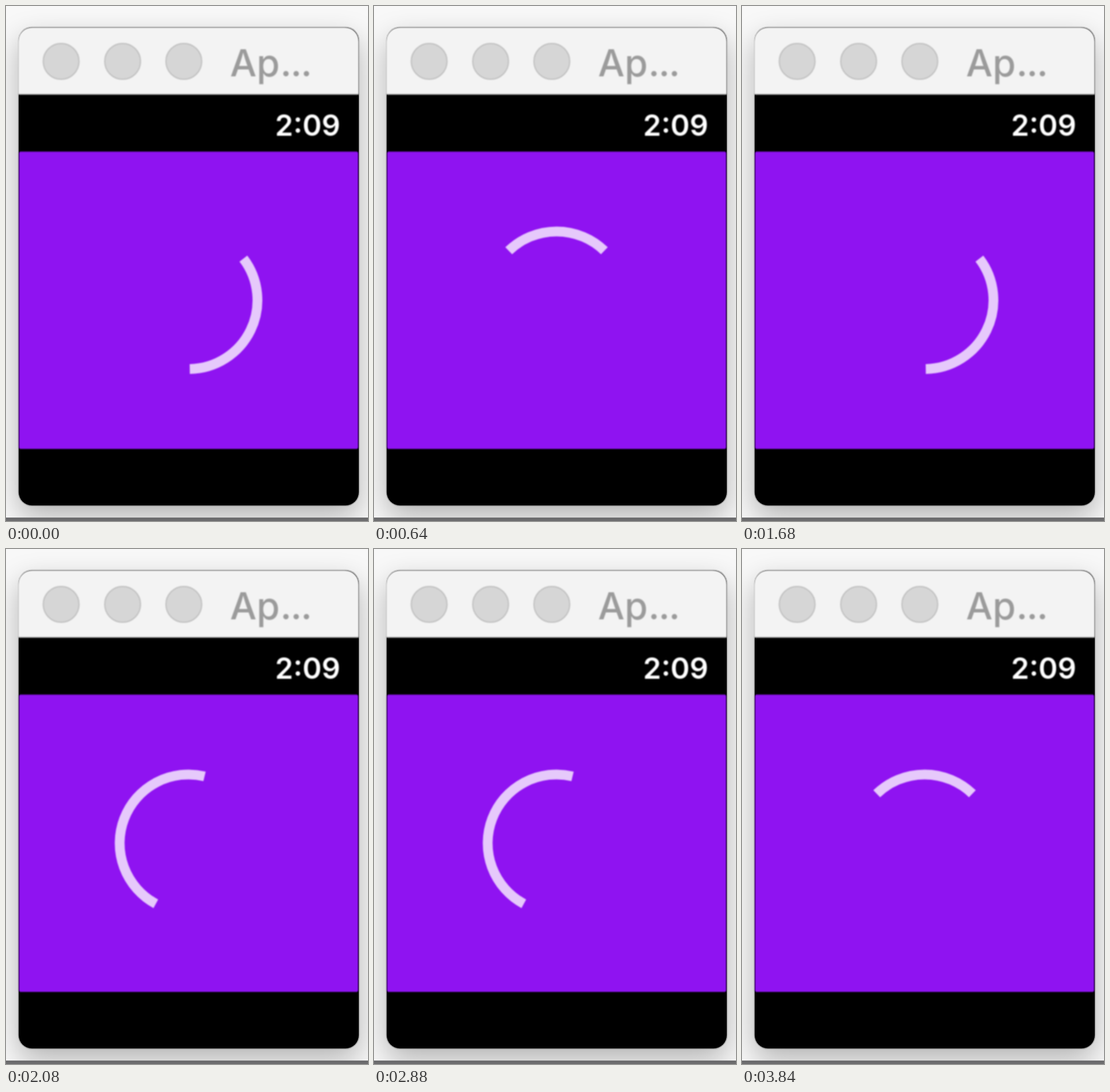
These frames come from a looping animation (627x893 px, 3920 ms). An HTML page:

```html
<!DOCTYPE html>
<html lang="en">
<head>
<meta charset="utf-8">
<title>Loading spinner</title>
<style>
  html, body { margin: 0; width: 100%; height: 100%; overflow: hidden; background: #f8f8f8; }
  .window {
    position: absolute; left: 21.5px; top: 37px; width: 589px; height: 828.5px;
    border-radius: 23px; background: #000; filter: blur(.7px);
    box-shadow: 0 0 0 1.5px rgba(0, 0, 0, .24), 0 20px 50px rgba(0, 0, 0, .28);
  }
  .desk { position: absolute; left: 0; right: 0; top: 887px; height: 6px; background: #6c6c6e; }
  svg { position: absolute; left: 0; top: 0; }
  text { font-family: Inter, sans-serif; }
  .soft { filter: blur(.8px); }
  .screen { filter: blur(1.3px); }
</style>
</head>
<body>
<div class="window"></div>
<div class="desk"></div>
<svg width="627" height="893" viewBox="0 0 627 893">
  <g class="soft">
    <path d="M21 153V61a24 24 0 0 1 24-24H587a24 24 0 0 1 24 24V153Z" fill="#f3f3f3"/>
    <path d="M21 153H611" stroke="#c4c4c4" stroke-width="1.5"/>
    <g fill="#d6d6d6" stroke="#bfbfbf" stroke-width="2">
      <circle cx="95.5" cy="96" r="31"/>
      <circle cx="202" cy="96" r="31"/>
      <circle cx="308" cy="96" r="31"/>
    </g>
    <g fill="#9b9b9b" font-size="65" font-weight="500">
      <text x="388" y="122">Ap</text>
      <text x="475" y="122" letter-spacing="-2">...</text>
    </g>
    <text x="579" y="225" text-anchor="end" font-size="50.4" font-weight="600" fill="#fff">2:09</text>
  </g>
  <rect class="screen" x="22.5" y="252.5" width="587.5" height="515.5" rx="3" fill="#8f13f1"/>
  <path id="arc" class="soft" fill="none" stroke="#e6c9fb" stroke-width="17"/>
</svg>
<script>
  const LOOP = 3920, STEP = 80, TURN = 800;
  const CX = 316.2, CY = 510.2, RADIUS = 119.3;
  const arc = document.getElementById('arc');

  // Clockwise degrees from the top: steady rotation plus a periodic sway
  const sway = (phase, base, c, s, c2) =>
    phase * 360 + base + c * Math.cos(phase * 2 * Math.PI)
      + s * Math.sin(phase * 2 * Math.PI) + c2 * Math.cos(phase * 4 * Math.PI);

  const point = degrees => {
    const a = degrees * Math.PI / 180;
    return `${CX + RADIUS * Math.sin(a)} ${CY - RADIUS * Math.cos(a)}`;
  };

  function draw(now) {
    const step = Math.max(1, Math.floor(now % LOOP / STEP));
    const phase = step * STEP / TURN % 1;
    const tail = sway(phase, 4.1, 27.7, -17.4, 1.5);
    const head = sway(phase, 148.3, -24.1, 20.9, 6.2);
    const large = head - tail > 180 ? 1 : 0;
    arc.setAttribute('d', `M${point(tail)}A${RADIUS} ${RADIUS} 0 ${large} 1 ${point(head)}`);
  }

  const start = performance.now();
  function tick() {
    draw(performance.now() - start);
    requestAnimationFrame(tick);
  }
  tick();
</script>
</body>
</html>
```
